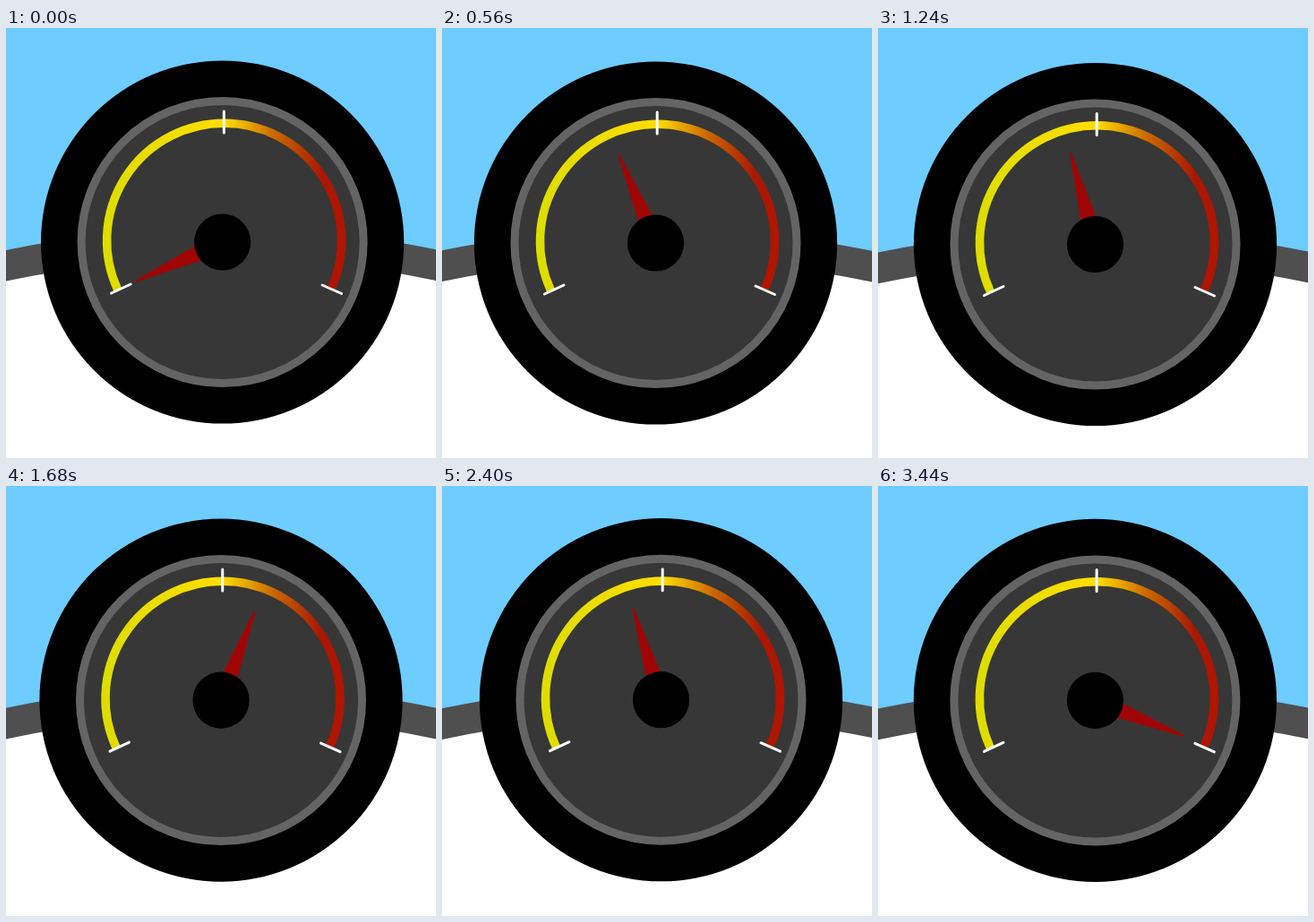
Recreate the animation shown at these times as an HTML page. Size 480 by 480 pixels, loop 3480 ms.

```html
<!DOCTYPE html>
<html lang="en">
<head>
<meta charset="utf-8">
<title>Rev counter</title>
<style>
  html, body { margin: 0; width: 100%; height: 100%; overflow: hidden; }
  svg { display: block; width: 100vw; height: 100vh; background: #6eccff; }
</style>
</head>
<body>
<svg viewBox="0 0 480 480">
  <defs>
    <linearGradient id="heat" gradientUnits="userSpaceOnUse" x1="-133" x2="138" y1="0" y2="0">
      <stop offset="0" stop-color="#dd0"/>
      <stop offset=".5" stop-color="#fd0"/>
      <stop offset=".7" stop-color="#cc6a00"/>
      <stop offset=".9" stop-color="#a81800"/>
      <stop offset="1" stop-color="#b41400"/>
    </linearGradient>
  </defs>
  <g id="scene">
    <circle cy="1184.5" r="1183" fill="#fff" stroke="#4f4f4f" stroke-width="34"/>
    <circle r="202.6"/>
    <circle r="157.5" fill="#373737" stroke="#646464" stroke-width="9"/>
    <path d="M-117 53A131 131 0 1 1 121 53" fill="none" stroke="url(#heat)" stroke-width="9.5"/>
    <path d="M-124 57L-102.500 47M1.700 -146V-122M111.500 48L133 57.500" stroke="#fff" stroke-width="3" stroke-linecap="round"/>
    <path id="needle" d="M-9 -26L-1 -106Q0 -108 1 -106L9 -26Z" fill="#a00505"/>
    <circle r="31.600"/>
  </g>
</svg>
<script>
  const LOOP = 3480, STEP = 40, SHAKE = 3;
  const scene = document.getElementById('scene');
  const needle = document.getElementById('needle');

  // [time, x, y]: resting points of the shake
  const places = [
    [0, 241.6, 239], [560, 238.5, 240], [1240, 242.5, 241.5], [1680, 240, 239.1],
    [2400, 244.5, 238.7], [2880, 239.2, 243.2], [3440, 242.4, 239.4]
  ];
  // [time, degrees from vertical]
  const revs = [
    [0, -114.3], [560, -22.7], [800, 15], [1240, -15], [1680, 20.8],
    [2400, -17], [2880, 111.5], [3440, 111.8]
  ];

  function sample(keys, t) {
    const i = Math.max(1, keys.findIndex(key => key[0] >= t));
    const a = keys[i - 1], b = keys[i];
    const u = (t - a[0]) / (b[0] - a[0]);
    return { i, u, values: a.slice(1).map((v, k) => v + (b[k + 1] - v) * u) };
  }

  function draw(now) {
    const t = Math.floor(now % LOOP / STEP) * STEP;
    const { i, u, values: [x, y] } = sample(places, t);
    const sway = SHAKE * Math.sin(Math.PI * (5 + i % 2) * u);
    const bounce = SHAKE * Math.sin(Math.PI * (7 - i % 2) * u);
    scene.setAttribute('transform', `translate(${x + sway} ${y + bounce})`);
    needle.setAttribute('transform', `rotate(${sample(revs, t).values[0]})`);
  }

  const start = performance.now();
  function tick() {
    draw(performance.now() - start);
    requestAnimationFrame(tick);
  }
  tick();
</script>
</body>
</html>
```
